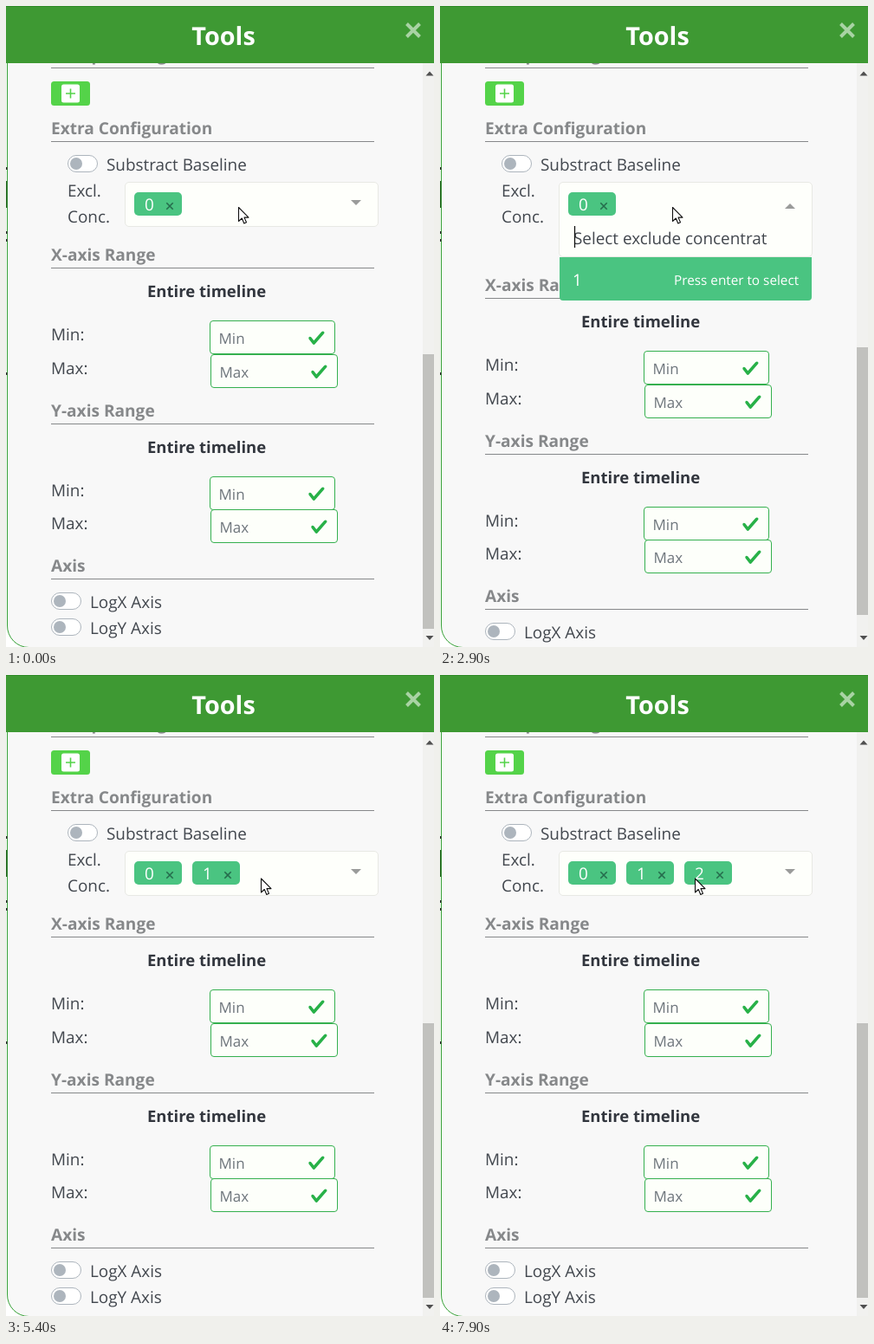
An HTML page that plays this animation: 494x740 px, repeating every 8 s.

```html
<!DOCTYPE html>
<html lang="en">
<head>
<meta charset="utf-8">
<title>Tools panel</title>
<style>
  html, body { margin: 0; width: 100%; height: 100%; overflow: hidden; background: #fff; }
  svg { display: block; width: 494px; height: 740px; }
  text { font: 18.9px "Open Sans", "Noto Sans", sans-serif; fill: #42474e; text-rendering: geometricPrecision; }
  .title { font-size: 28.8px; font-weight: 700; fill: #fff; text-anchor: middle; }
  .head { font-size: 19.1px; font-weight: 700; fill: #86888a; }
  .sub { font-size: 18.5px; font-weight: 700; fill: #32363e; }
  .field { font-size: 17px; fill: #6e757c; }
  .light { fill: #fff; }
  .hint { font-size: 15.3px; fill: #fff; }
  .rule { stroke: #86888a; }
  .input { fill: #fdfffa; stroke: #35b04f; }
  .check { fill: #28b148; }
  .box { fill: #fefffb; stroke: #e8e9e4; }
  .tag { fill: #4ac481; }
  .cross { stroke: #266d4d; stroke-width: 1.6; }
  .cursor { fill: #fff; stroke: #111; stroke-width: 1.1; stroke-linejoin: round; }
</style>
</head>
<body>
<svg id="stage" viewBox="0 0 494 740"></svg>
<script>
const LOOP = 8000, SHIFT = 35;
const OPEN_1 = 1490, PICK_1 = 3601, LEAVE = 4945, OPEN_2 = 5500, PICK_2 = 6900;

const text = (x, y, s, cls = '') =>
  `<text x="${x}" y="${Math.round(y)}" class="${cls}">${s}</text>`;
const rect = (x, y, w, h, r, attrs) =>
  `<rect x="${x}" y="${y}" width="${w}" height="${h}" rx="${r}" ${attrs}/>`;
const path = (d, attrs) => `<path d="${d}" ${attrs}/>`;
const cross = (x, y, r, attrs) =>
  path(`M${x - r} ${y - r}l${2 * r} ${2 * r}m0 ${-2 * r}l${-2 * r} ${2 * r}`, attrs);

const section = (y, s) =>
  text(52, y, s, 'head') + path(`M52 ${Math.round(y) + 8.5}H425`, 'class="rule"');

const toggle = (x, y, s) =>
  rect(x + .5, y - 17.5, 34, 19, 9.5, 'fill="#fff" stroke="#adb5bd"') +
  `<circle cx="${x + 10}" cy="${y - 8}" r="7" fill="#adb5bd"/>` + text(x + 45, y, s);

const input = (x, y, w, s) => {
  const top = Math.round(y) + .5;
  return rect(x, top, w, 38, 3.5, 'class="input"') + text(x + 10, top + 26, s, 'field') +
    path('M2.3 6.7L.6 4.5C.2 3.500 1.100 3.100 1.700 3.700L2.800 5.100L6.200 1.300C6.800.7 7.800 1.100 7.400 2L3.400 6.600C3 7.100 2.600 7 2.300 6.700Z',
      `class="check" transform="translate(${x + w - 31.5} ${top + 9.4}) scale(2.6)"`);
};

// Row offsets are fractional and snap to whole pixels.
const range = (y, axis) =>
  section(y, axis + '-axis Range') + text(163, y + 42, 'Entire timeline', 'sub') +
  text(52, y + 92, 'Min:') + text(52, y + 130.6, 'Max:') +
  input(235.5, y + 69, 144, 'Min') + input(236.5, y + 107.6, 146, 'Max');

const tag = n => {
  const x = 148 + 67 * n;
  return `<g id="tag${n}">` + rect(x, 215, 55, 27, 5, 'class="tag"') +
    (n === 1 ? rect(x + 27, 215, 28, 27, 5, 'id="hover" fill="#38a26c"') : '') +
    text(x + 12, 236, n, 'light') +
    cross(x + 41, 231, 3.7, `class="cross" id="cross${n}"`) + '</g>';
};

const stage = document.getElementById('stage');
stage.innerHTML =
  path('M1.5 0V715A25 25 0 0 0 26.5 740.5H495V0Z', 'fill="#f8f8f8" stroke="#35a035"') +
  rect(0, 202, 1.5, 31, 0, 'fill="#2b6b26"') +
  [186, 260, 269, 423].map(y => rect(0, y, 1.5, 3, 0, 'fill="#333"')).join('') +

  section(63, 'Groups Configuration') +
  rect(52, 87, 45, 28, 3.5, 'fill="#54d349"') + rect(64, 90.5, 21, 21, 2.5, 'fill="#fff"') +
  path('M74.5 95.5V106.5M69 101H80', 'stroke="#54d349" stroke-width="1.6"') +
  section(148, 'Extra Configuration') + toggle(71, 190, 'Substract Baseline') +
  text(71, 220, 'Excl.') + text(71, 250, 'Conc.') +

  '<g id="lower">' + range(294.3, 'X') + range(473.8, 'Y') + section(653, 'Axis') +
  toggle(52, 695, 'LogX Axis') + toggle(52, 725, 'LogY Axis') + '</g>' +

  rect(137.5, 203.5, 292, 51, 4.5, 'id="select" class="box"') +
  '<g id="search">' + text(154, 275, 'Select exclude concentrat') +
  path('M155.5 254V279', 'id="caret" stroke="#111" stroke-width="1.3"') + '</g>' +
  '<g id="option">' + path('M138 290H429V336Q429 340 425 340H142Q138 340 138 336Z', 'class="tag"') +
  text(153, 323, '1', 'light') + text(270, 322, 'Press enter to select', 'hint') + '</g>' +
  path('M137.5 289.5H429.5V316Q429.5 320.5 425 320.5H142Q137.5 320.5 137.5 316Z', 'id="empty" class="box"') +
  path('M-6-5H6L0 1Z', 'id="arrow" fill="#9a9b9a"') +
  [0, 1, 2].map(tag).join('') +

  rect(481, 66, 13, 674, 0, 'fill="#f1f1ef"') +
  rect(481, 402, 13, 317, 0, 'id="thumb" fill="#c1c1be"') +
  path('M484.5 80.5L489 75.5L493.5 80.5ZM484.5 727L489 732L493.5 727Z', 'fill="#505050"') +
  rect(0, 0, 494, 66, 0, 'fill="#3e9933"') + rect(0, 0, 494, 1, 0, 'fill="#2f8a28"') +
  text(251, 45, 'Tools', 'title') +
  cross(470, 28, 7.5, 'stroke="#a9d3a4" stroke-width="4"') +

  path('M0 0V16L3.8 12.5L6.3 18.5L9 17.3L6.5 11.6H11.5Z', 'id="pointer" class="cursor"') +
  path('M-1 13V2Q-1 0 .8 0T2.7 2V8Q5 6.5 6 9Q8.5 7.8 9.2 10Q12 9.5 12 12V16Q11.5 19 10 21V23H1V21L-5 13.5Q-6 12-5 11Q-3.5 10-1 13Z',
    'id="hand" class="cursor"');

const el = {};
for (const node of stage.querySelectorAll('[id]')) el[node.id] = node;
const show = (node, on) => node.setAttribute('display', on ? 'inline' : 'none');
const move = (node, x, y, turn = 0) =>
  node.setAttribute('transform', `translate(${x} ${y}) rotate(${turn})`);

const clamp = v => Math.min(1, Math.max(0, v));
const bezier = (u, a, b) => 3 * u * (1 - u) * ((1 - u) * a + u * b) + u ** 3;

// Same curve as the CSS "ease" keyword.
function ease(v) {
  const x = clamp(v);
  let lo = 0, hi = 1;
  for (let i = 0; i < 20; i++) {
    const mid = (lo + hi) / 2;
    if (bezier(mid, .25, .25) < x) lo = mid; else hi = mid;
  }
  return x === 0 || x === 1 ? x : bezier(lo, .1, 1);
}
const fade = (t, start, length = 200) => ease((t - start) / length);

function render(t) {
  const first = t >= OPEN_1 && t < PICK_1;
  const second = t >= OPEN_2 && t < PICK_2;
  const open = first || second;
  const openedAt = second ? OPEN_2 : OPEN_1;

  move(el.lower, 0, open ? SHIFT : 0);
  el.select.setAttribute('height', open ? 86 : 51);
  el.thumb.setAttribute('y', open ? 394 : 402);
  el.thumb.setAttribute('height', open ? 309 : 317);
  show(el.search, open);
  show(el.caret, (t - openedAt) % 1000 < 500);
  show(el.option, first);
  show(el.empty, second);
  el.option.setAttribute('opacity', fade(t, OPEN_1, 150));
  el.empty.setAttribute('opacity', fade(t, OPEN_2, 150));

  const turn = fade(t, OPEN_1) - fade(t, PICK_1) + fade(t, OPEN_2) - fade(t, PICK_2);
  move(el.arrow, 404, 229, 180 * turn);

  show(el.tag1, t >= PICK_1);
  show(el.tag2, t >= PICK_2);
  const hovering = t >= PICK_1 && t < LEAVE;
  el.hover.setAttribute('opacity', 1 - fade(t, LEAVE));
  el.cross1.style.stroke = hovering ? '#fff' : '';
  el.cross1.style.strokeWidth = hovering ? 2.2 : '';

  const leave = clamp((t - 4930) / 70), glide = clamp((t - 5000) / 250);
  const x = 268.5 + 9 * leave + 17 * glide, y = 232.5 + 2.5 * leave;
  move(el.pointer, x, y);
  move(el.hand, x, y);
  show(el.pointer, !hovering);
  show(el.hand, hovering);
}

const start = performance.now();
function tick() {
  render((performance.now() - start) % LOOP);
  requestAnimationFrame(tick);
}
tick();
</script>
</body>
</html>
```
